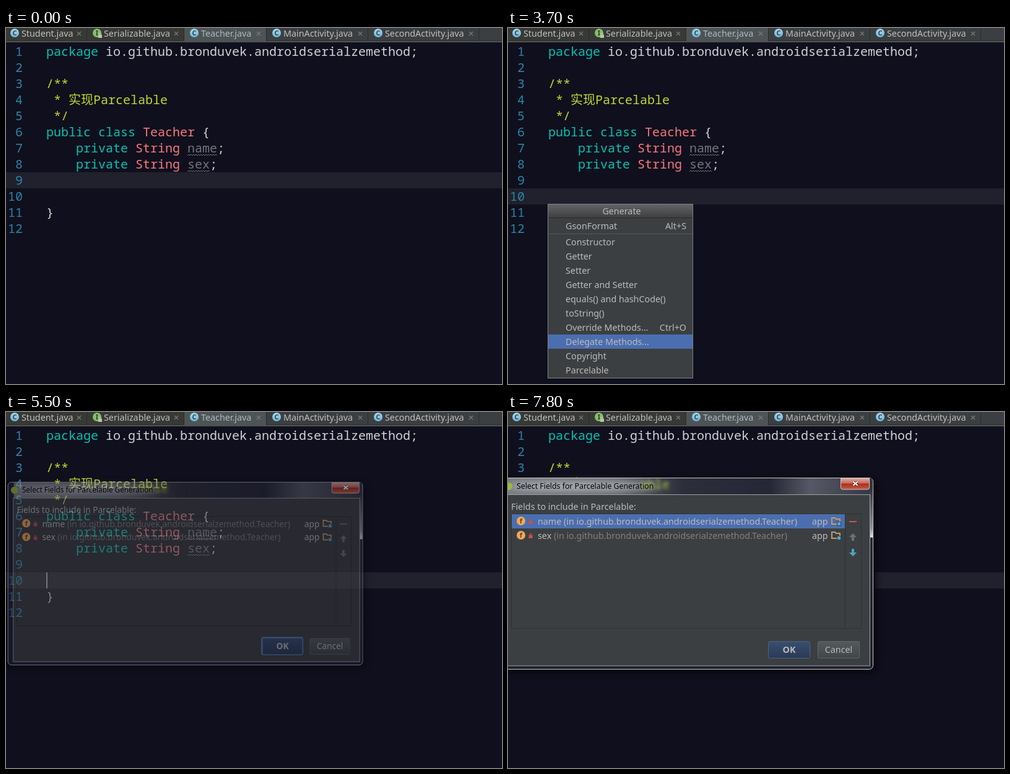
Animation, 801 px wide and 575 px high, one loop 8000 ms. Source, as an HTML page:

```html
<!DOCTYPE html>
<html lang="en">
<head>
<meta charset="utf-8">
<style>
  html, body { margin: 0; width: 100%; height: 100%; overflow: hidden; background: #100f1d; }
  svg { display: block; font: 14.3px "Noto Sans", "Open Sans", sans-serif; fill: #bbb; }
  .code { font: 20px "Noto Sans Mono", "Noto Sans CJK SC", monospace; }
  .mid { text-anchor: middle; }
  .end { text-anchor: end; }
</style>
</head>
<body>
<svg id="stage" width="801" height="575" viewBox="0 0 801 575"></svg>
<script>
const LOOP = 8000;
const PACKAGE = 'io.github.bronduvek.androidserialzemethod';
const MENU = ['GsonFormat', 'Constructor', 'Getter', 'Setter', 'Getter and Setter', 'equals() and hashCode()',
  'toString()', 'Override Methods...', 'Delegate Methods...', 'Copyright', 'Parcelable'];
const SHORTCUTS = { 0: 'Alt+S', 7: 'Ctrl+O' };
// [start time, selected menu entry]; a held key advances three entries per step
const SELECTION = [[2400, 0], [3100, 1], [3500, 2], [3600, 5], [3700, 8], [3800, 0], [4400, 10]];
const COLOR = { keyword: '#00c4b4', type: '#f7787f', comment: '#bfd833', plain: '#d0d2d8', dim: '#74747a' };

const rect = (x, y, w, h, fill, extra = '') =>
  `<rect x="${x}" y="${y}" width="${w}" height="${h}" fill="${fill}" ${extra}/>`;
const text = (x, y, content, fill = '#bbb', extra = '') =>
  `<text x="${x}" y="${y}" fill="${fill}" ${extra}>${content}</text>`;
const path = (d, stroke, width = 1) => `<path d="${d}" fill="none" stroke="${stroke}" stroke-width="${width}"/>`;
const group = (id, content) => `<g id="${id}">${content}</g>`;
const gradient = (id, stops, horizontal) =>
  `<linearGradient id="${id}" x2="${horizontal ? 1 : 0}" y2="${horizontal ? 0 : 1}">` +
  stops.map(([at, color]) => `<stop offset="${at}" stop-color="${color}"/>`).join('') + '</linearGradient>';
const blur = (id, amount) =>
  `<filter id="${id}" x="-50%" y="-100%" width="200%" height="300%"><feGaussianBlur stdDeviation="${amount}"/></filter>`;

const rowTop = line => 26 * line - 1;
const menuTop = i => i ? 311 + 23 * i : 308;

const defs = '<defs>' +
  gradient('header', [[0, '#606264'], [1, '#3e4042']]) +
  gradient('glass', [[0, '#777b80'], [.3, '#62656b'], [.48, '#2c2e3a'], [.72, '#252735'], [.83, '#565965'], [1, '#343644']], true) +
  gradient('side', [[0, '#343644'], [.22, '#8d9098'], [.27, '#dfe1e4'], [.275, '#262837'], [1, '#1e2030']]) +
  gradient('close', [[0, '#dfa99f'], [.45, '#c56a5b'], [.5, '#a92f1c'], [1, '#c75a40']]) +
  gradient('primary', [[0, '#384f6f'], [1, '#293a55']]) +
  gradient('button', [[0, '#555a5c'], [1, '#414648']]) +
  gradient('blueIcon', [[0, '#a5d6ea'], [1, '#72b5d6']]) +
  blur('soft', 6) + blur('smear', 2.5) + '</defs>';

function lock(x, y, color) {
  return path(`M${x - 1.5} ${y}v-2.5q1.5-2 3 0v2.5`, color, 1.2) + rect(x - 3, y - 1, 6, 5, color);
}

function badge(x, y, letter, fill, ink) {
  return `<circle cx="${x}" cy="${y}" r="7" fill="${fill}"/>` +
    text(x, y + 4, letter, ink, 'class="mid" font-size="11" font-weight="600"');
}

function tab(left, right, name, state = '') {
  const shared = state === 'interface';
  const active = state === 'active';
  const x = left + (left ? 16 : 14);
  const background = active ? '#4e5456' : left < 288 ? '#383935' : '#3c3f41';
  return rect(left, 0, right - left, 20, background) + rect(right - 1, 0, 1, 20, '#292b2c') +
    badge(x, 8, shared ? 'I' : 'C', shared ? '#83bd6d' : 'url(#blueIcon)', shared ? '#25461d' : '#294a5c') +
    (shared ? lock(152, 12, '#b8c5ae') : '') +
    text(x + 11, 14, name, active ? '#aebac0' : '#c0c0c0') +
    path(`M${right - 16} 6l6 6m0-6l-6 6`, '#777a7c', 1.3);
}

function tabs() {
  return rect(0, 0, 801, 20, '#3c3f41') + rect(0, 20, 801, 1, '#2b2d2e') +
    rect(0, 21, 801, 2, '#4e5456') + rect(0, 23, 801, 1, '#1c1d21') +
    rect(288, 20, 132, 1, '#4e5456') +
    tab(0, 131, 'Student.java') + tab(131, 288, 'Serializable.java', 'interface') +
    tab(288, 421, 'Teacher.java', 'active') + tab(421, 585, 'MainActivity.java') +
    tab(585, 764, 'SecondActivity.java');
}

function code(line, column, content, kind) {
  return text(65 + 12 * column, rowTop(line) + 20, content, COLOR[kind], 'class="code"');
}

function unusedField(line, name) {
  const wave = `M293 ${rowTop(line) + 25}` + 'l2 -2l2 2'.repeat(name.length * 3);
  return code(line, 4, 'private', 'keyword') + code(line, 12, 'String', 'type') +
    code(line, 19, name, 'dim') + code(line, 19 + name.length, ';', 'plain') + path(wave, COLOR.dim);
}

function editor() {
  const numbers = Array.from({ length: 12 }, (_, i) =>
    text(27, rowTop(i + 1) + 20, i + 1, '#2986a8', 'class="code end"')).join('');
  return rect(0, 24, 801, 551, '#100f1d') +
    rect(0, 0, 801, 26, '#21202d', 'id="currentLine"') + numbers +
    code(1, 0, 'package', 'keyword') + code(1, 8, PACKAGE + ';', 'plain') +
    code(3, 0, '/**', 'comment') + code(4, 1, '* 实现Parcelable', 'comment') + code(5, 1, '*/', 'comment') +
    code(6, 0, 'public class', 'keyword') + code(6, 13, 'Teacher', 'type') + code(6, 21, '{', 'plain') +
    unusedField(7, 'name') + unusedField(8, 'sex') + code(11, 0, '}', 'plain') +
    rect(65, 259, 2, 26, '#bbb', 'id="caret"');
}

function menu() {
  const entries = MENU.map((label, i) => text(93, menuTop(i) + 17, label) +
    (SHORTCUTS[i] ? text(288, menuTop(i) + 17, SHORTCUTS[i], '#bbb', 'class="end"') : '')).join('');
  return rect(64.5, 284.5, 234, 281, '#3c3f41', 'stroke="#808284"') +
    rect(65, 285, 233, 21, 'url(#header)') + rect(65, 306, 233, 1, '#292b2c') +
    rect(65, 332, 233, 1, '#555859') + text(183.5, 301, 'Generate', '#bbb', 'class="mid"') +
    rect(65, 0, 233, 23, '#4b6eaf', 'id="menuBar"') + entries;
}

function field(top, name) {
  return badge(21, top + 11, 'f', '#eda95c', '#6b421b') + lock(36.5, top + 12, '#c9504d') +
    `<text x="48" y="${top + 17}">${name} <tspan class="detail" fill="#808080">(in ${PACKAGE}.Teacher)</tspan></text>` +
    text(491, top + 17, 'app') +
    path(`M523 ${top + 16}v-10h5l2 2h6v8z`, '#c29a6b', 2) + rect(531, top + 12, 7, 7, '#3c3f41') +
    rect(532, top + 13, 5, 5, '#4ea6d8');
}

function button(x, label, fill, border, weight) {
  return rect(x + .5, 370.5, 67, 27, fill, `rx="2" stroke="${border}"`) +
    text(x + 34, 389, label, '#bbb', `class="mid" font-weight="${weight}"`);
}

function arrow(id, y, direction) {
  return `<path id="${id}" fill="#6e7072" d="M557 ${y + 6 * direction}l-6 ${-6 * direction}h4v${-6 * direction}h4v${6 * direction}h4z"/>`;
}

function dialog() {
  const cross = 'M557.5 112.5l7 6m0-6l-7 6';
  return rect(-20, 108, 614, 312, '#000', 'rx="8" opacity=".75" filter="url(#soft)"') +
    rect(-10, 106.5, 599.5, 309, '#1e2030', 'rx="6" stroke="#c3c7cd"') +
    rect(0, 107, 588, 27, 'url(#glass)') + rect(584, 125, 5, 285, 'url(#side)') +
    '<ellipse cx="122" cy="120" rx="122" ry="8" fill="#d5d9dc" opacity=".6" filter="url(#soft)"/>' +
    text(213, 124, 'able', '#a9bd3d', 'class="code" filter="url(#smear)"') +
    '<circle cx="1" cy="120" r="6" fill="#98bd38"/>' +
    text(14, 124, 'Select Fields for Parcelable Generation', '#000', 'font-size="12.3"') +
    '<path d="M537.5 107v15q0 3 3 3h40q3 0 3-3v-15z" fill="url(#close)" stroke="#d2c6c8"/>' +
    path(cross, '#63302c', 4) + path(cross, '#fff', 2.2) +
    rect(-1, 133.5, 585.5, 276.5, '#3c3f41', 'stroke="#9da1a7"') +
    text(5, 158, 'Fields to include in Parcelable:') +
    rect(5.5, 164.5, 565, 185, '#3c3f41', 'stroke="#2f3132"') + rect(544, 165, 1, 185, '#2f3132') +
    rect(6, 165, 538, 23, '#4b6eaf', 'id="fieldBar"') +
    group('firstField', field(165, 'name')) + field(188, 'sex') +
    rect(551, 176, 12, 2, '#6e7072', 'id="remove"') + arrow('moveUp', 202, -1) + arrow('moveDown', 227, 1) +
    rect(419, 369, 69, 29, 'none', 'id="focusRing" rx="3" stroke="#5688bd" stroke-width="2"') +
    button(420, 'OK', 'url(#primary)', '#4c6382', 700) +
    button(500, 'Cancel', 'url(#button)', '#626668', 400);
}

document.getElementById('stage').innerHTML =
  defs + editor() + tabs() + group('menu', menu()) + group('dialog', dialog());

const el = id => document.getElementById(id);
const show = (id, visible) => el(id).setAttribute('visibility', visible ? 'inherit' : 'hidden');
const paint = (id, color) => el(id).setAttribute('fill', color);
const within = (t, from, to) => t >= from && t < to;

function render(t) {
  el('currentLine').setAttribute('y', rowTop(t < 900 ? 9 : 10));
  show('caret', within(t, 900, 1800) || within(t, 2300, 2400) || within(t, 5400, 5700));

  show('menu', within(t, 2400, 5400));
  const selected = SELECTION.filter(([start]) => t >= start).pop()?.[1] ?? 0;
  el('menuBar').setAttribute('y', menuTop(selected));

  // The window fades and grows in three steps, easing out
  const progress = Math.min(1, Math.max(0, Math.floor((t - 5400) / 100) / 3));
  const opening = 1 - (1 - progress) ** 2;
  show('dialog', opening > 0);
  el('dialog').setAttribute('opacity', opening);
  el('dialog').setAttribute('transform',
    `translate(285 261) scale(${.9 + .1 * opening}) translate(-285 -261)`);

  const picked = t >= 7600;
  show('fieldBar', picked);
  show('focusRing', !picked);
  el('firstField').querySelector('.detail').setAttribute('fill', picked ? '#bbb' : '#808080');
  paint('remove', t >= 7800 ? '#c75450' : '#6e7072');
  paint('moveDown', t >= 7800 ? '#4ba3c7' : '#6e7072');
}

function frame() {
  render(performance.now() % LOOP);
  requestAnimationFrame(frame);
}
frame();
</script>
</body>
</html>
```
